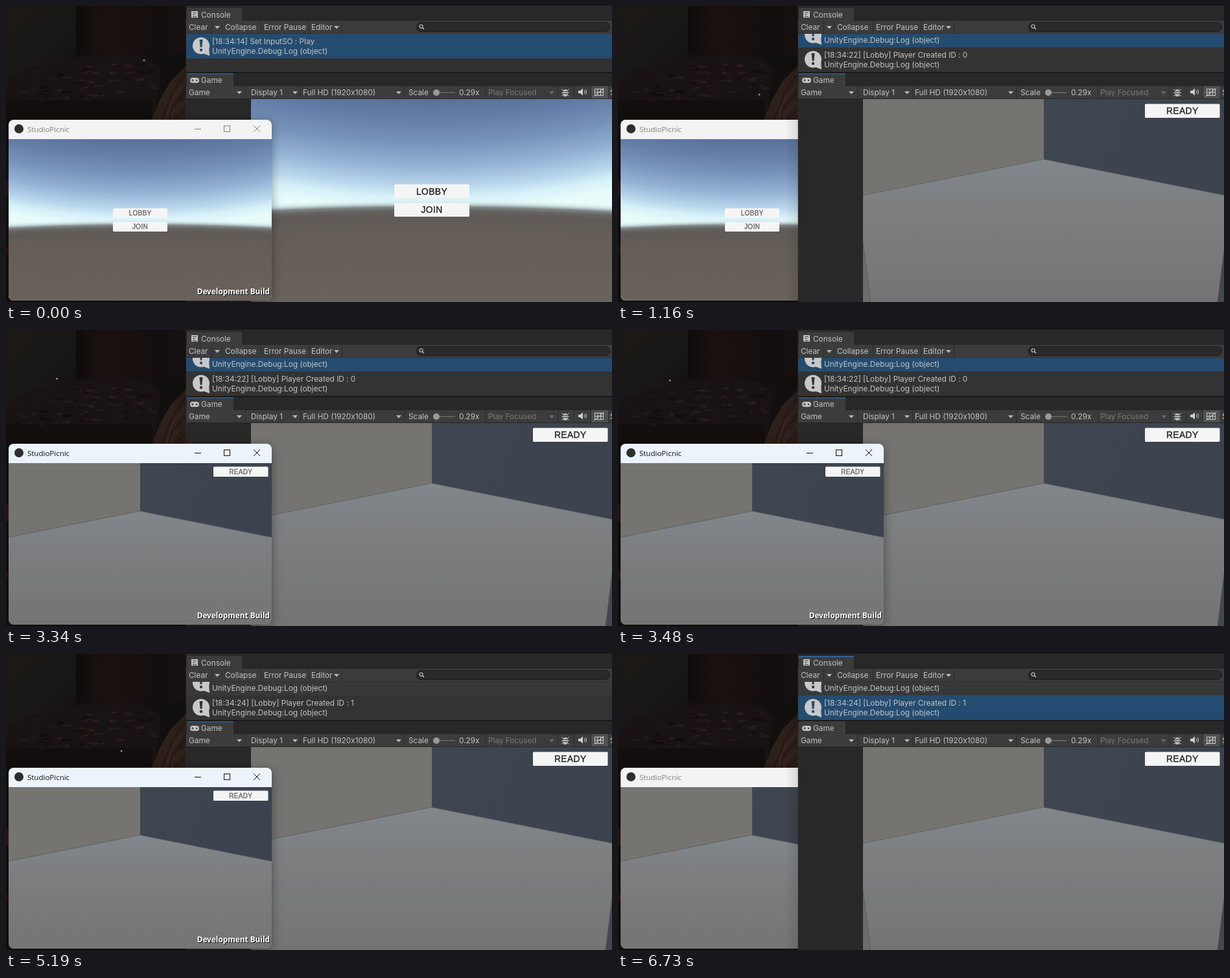
An HTML page with a canvas for the animation above (6.81 s loop, 935 px wide and 458 px high).

```html
<!DOCTYPE html>
<html lang="en">
<head>
<meta charset="utf-8">
<title>Two players joining a lobby</title>
<style>
html, body { margin: 0; width: 935px; height: 458px; overflow: hidden; background: #120f0f; }
canvas { display: block; }
</style>
</head>
<body>
<canvas id="stage" width="935" height="458"></canvas>
<script>
const c = document.getElementById('stage').getContext('2d');
const LOOP = 6810;
// Moments of the story, in ms
const HOVER_LOBBY = 520, EDITOR_FRONT = 690, HOST_LOADED = 1160, HOVER_JOIN = 2700,
  BUILD_FRONT = 2950, GUEST_LOADED = 3260, GUEST_LOGGED = 3630,
  EDITOR_AGAIN = 5790, ROW_PICKED = 5880;
const UI = '11.8px Inter, sans-serif';
const ARIAL = '"Liberation Sans", Arial, sans-serif';

function rect(x, y, w, h, fill) {
  c.fillStyle = fill;
  c.fillRect(x, y, w, h);
}
function round(x, y, w, h, r, fill) {
  c.beginPath();
  c.roundRect(x, y, w, h, r);
  c.fillStyle = fill;
  c.fill();
}
function dot(x, y, r, fill) {
  c.beginPath();
  c.arc(x, y, r, 0, 7);
  c.fillStyle = fill;
  c.fill();
}
function shape(fill, ...p) {
  c.beginPath();
  for (let i = 0; i < p.length; i += 2) c.lineTo(p[i], p[i + 1]);
  c.fillStyle = fill;
  c.fill();
}
function line(color, width, ...p) {
  c.beginPath();
  for (let i = 0; i < p.length; i += 2) c.lineTo(p[i], p[i + 1]);
  c.strokeStyle = color;
  c.lineWidth = width;
  c.stroke();
}
function text(s, x, y, fill = '#c4c4c4', font = UI, align = 'left') {
  c.font = font;
  c.textAlign = align;
  c.textBaseline = 'alphabetic';
  c.fillStyle = fill;
  c.fillText(s, x, y);
}
function stops(gradient, list) {
  list.forEach(([at, color]) => gradient.addColorStop(at, color));
  return gradient;
}
function clipped(x, y, w, h, draw) {
  c.save();
  c.beginPath();
  c.rect(x, y, w, h);
  c.clip();
  draw();
  c.restore();
}
const mix = (a, b, k) => a + (b - a) * Math.max(0, Math.min(1, k));
const gray = v => `rgb(${v},${v},${v})`;

function wallpaper(t) {
  let seed = 11;
  const rnd = () => (seed = seed * 16807 % 2147483647) / 2147483647;
  rect(0, 0, 278, 458, '#120f0f');
  rect(0, 0, 108, 125, stops(c.createLinearGradient(0, 0, 108, 110),
    [[0, '#1c1917'], [.7, '#181614'], [1, '#0f0d0d']]));
  rect(108, 0, 170, 74, stops(c.createLinearGradient(108, 0, 278, 0),
    [[0, '#0e0b0b'], [.2, '#1a100f'], [.55, '#180f0f'], [.75, '#130e0e'], [1, '#181111']]));
  // Sofa with worn patches
  c.beginPath();
  c.moveTo(0, 122);
  c.bezierCurveTo(20, 90, 70, 88, 110, 80);
  c.bezierCurveTo(170, 68, 225, 72, 240, 100);
  c.lineTo(228, 178);
  c.lineTo(0, 178);
  c.fillStyle = '#181212';
  c.fill();
  const patches = ['#231918', '#2b1c1a', '#1f1615', '#110d0d'];
  for (let i = 0; i < 110; i++) {
    const x = 12 + rnd() * 215, row = Math.floor(rnd() * 5);
    const y = 88 + row * 11 + 22 * ((x - 190) / 190) ** 2 + rnd() * 5;
    c.save();
    c.translate(x, y);
    c.rotate(-.2 + rnd() * .4);
    rect(0, 0, 3 + rnd() * 9, 1 + rnd() * 3, patches[Math.floor(rnd() * 4)]);
    c.restore();
  }
  rect(0, 146, 226, 32, 'rgba(14,11,11,.55)');
  // Armrest
  shape('#2d1f1a', 278, 92, 254, 116, 237, 146, 224, 178, 278, 178);
  for (let i = 0; i < 6; i++)
    line(i % 2 ? '#382720' : '#231712', 2, 278, 104 + i * 14, 258 - i, 132 + i * 12, 240 + i * 6, 178);
  rect(0, 270, 4, 26, '#321714');
  rect(0, 372, 4, 12, '#2a1412');
  // A small light drifting about the room
  const path = [[0, 213, 84], [1080, 214, 133], [1160, 218, 137], [2880, 74, 66],
    [3480, 80, 78], [5190, 178, 150], [LOOP, 290, 160]];
  const n = path.findIndex(p => p[0] > t), [t0, x0, y0] = path[n - 1], [t1, x1, y1] = path[n];
  const k = (t - t0) / (t1 - t0);
  dot(mix(x0, x1, k), mix(y0, y1, k), 1.5, '#8f8a86');
}

function button(label, x, y, w, h, size, ink, shade = 245) {
  round(x, y, w, h, 1.5, gray(shade));
  c.letterSpacing = size * .03 + 'px';
  text(label, x + w / 2, y + h / 2 + size * .36, ink, `${size}px ${ARIAL}`, 'center');
  c.strokeStyle = ink;
  c.lineWidth = .4;
  c.strokeText(label, x + w / 2, y + h / 2 + size * .36);
  c.letterSpacing = '0px';
}

function skyScene(x, y, w, h) {
  const cx = x + w / 2, s = h / 314, horizon = y + h * .537;
  // The sky bows downwards in the middle, the ground upwards
  const top = y - 1200 * s, R = 4865 * s;
  rect(x, y, w, h, stops(
    c.createRadialGradient(cx, top, 1200 * s, cx, top, horizon - top),
    [[0, '#5b7199'], [.2, '#667f a8'.replace(' ', '')], [.4, '#7893ba'], [.62, '#95b3d5'],
      [.8, '#b9d7ec'], [.9, '#d6f1f8'], [1, '#e6fbfa']]));
  rect(x, y, w, h, stops(
    c.createRadialGradient(cx, horizon + R, R - 150 * s, cx, horizon + R, R + 14 * s),
    [[0, '#6a625c'], [.7, '#655e58'], [.85, '#605b58'], [.89, '#656361'],
      [.925, 'rgba(120,126,127,.95)'], [.96, 'rgba(190,210,212,.6)'], [1, 'rgba(230,250,250,0)']]));
}

function lobbyScene(x, y, w, h) {
  const cx = x + w / 2, s = h / 314, cy = y + 93 * s;
  const X = d => cx + d * s, Y = d => y + d * s;
  rect(x, y, w, h, stops(c.createLinearGradient(0, cy, 0, y + h),
    [[0, '#82878c'], [.35, '#7c7e80'], [.7, '#787978'], [1, '#747474']]));
  shape('#757471', X(-290), y, cx, y, cx, cy, X(-290), Y(151));
  shape(stops(c.createLinearGradient(cx, y, X(279), cy), [[0, '#3f4650'], [1, '#3c434e']]),
    cx, y, X(290), y, X(290), Y(151), cx, cy);
  line('#5f6163', 1, X(-290), Y(151), cx, cy);
  line('#4b5056', 1, cx, cy, X(290), Y(151));
  shape('#6c6c6a', X(-280), Y(214), X(-267), Y(314), X(-280), Y(314));
  shape('#43484f', X(280), Y(218), X(268), Y(314), X(280), Y(314));
  line('#5c5d5d', 1, X(-280), Y(214), X(-267), Y(314));
  line('#55585b', 1, X(280), Y(218), X(268), Y(314));
}

function buildWindow(t, front) {
  const active = t >= BUILD_FRONT && front, ink = active ? '#111' : '#808080';
  c.save();
  c.shadowColor = 'rgba(0,0,0,.4)';
  c.shadowBlur = 16;
  c.shadowOffsetY = 3;
  round(4, 176, 406, 280, 8, '#555');
  c.restore();
  c.save();
  c.beginPath();
  c.roundRect(4, 176, 406, 280, 8);
  c.clip();
  rect(4, 176, 406, 30, active ? '#edf3fb' : '#f3f3f3');
  dot(20, 190, 7, '#2e2e2e');
  text('StudioPicnic', 33, 195, ink, '11.5px "Open Sans", sans-serif');
  line(ink, 1, 291, 190.5, 301, 190.5);
  c.strokeRect(336.5, 185.5, 9, 9);
  line(ink, 1, 382, 185, 392, 195);
  line(ink, 1, 392, 185, 382, 195);
  if (t < GUEST_LOADED) {
    skyScene(4, 206, 406, 250);
    button('LOBBY', 165, 313, 84, 15, 10, '#6a6a6a');
    button('JOIN', 165, 334, 84, 15, 10, '#6a6a6a', mix(245, 236, (t - HOVER_JOIN) / 100));
  } else {
    lobbyScene(4, 206, 406, 250);
    button('READY', 320, 211.5, 84.5, 15.5, 10, '#6a6a6a');
  }
  const bold = 'bold 11.8px "Open Sans", sans-serif';
  text('Development Build', 408, 447, '#111', bold, 'right');
  text('Development Build', 407, 446, '#fff', bold, 'right');
  c.restore();
}

const arrow = (x, y, fill = '#b8b8b8') => shape(fill, x - 4, y - 2, x + 4, y - 2, x, y + 2.5);

function logRow(y, first, selected, fill) {
  const back = selected ? '#244c70' : fill;
  rect(278, y, 657, 38, back);
  dot(301, y + 18.5, 13, '#c8c8c8');
  shape('#c8c8c8', 303, y + 30, 313, y + 20, 314, y + 34);
  shape(back, 298.5, y + 9, 303.5, y + 9, 302.3, y + 21, 299.7, y + 21);
  dot(301, y + 25, 2.2, back);
  text(first, 318, y + 15.5);
  text('UnityEngine.Debug:Log (object)', 318, y + 30.5);
}

function consolePanel(t) {
  const picked = t >= ROW_PICKED, logged = t >= GUEST_LOGGED;
  rect(278, 0, 657, 23, '#282828');
  rect(278, 0, 657, 1, '#3d302b');
  rect(279, 3, 85, 20, '#3c3c3c');
  if (picked) rect(279, 3, 85, 2, '#2f639b');
  rect(286, 8, 10, 10, '#c4c4c4');
  for (let i = 0; i < 3; i++) rect(288, 10 + i * 3, i == 1 ? 4 : 6, 1, '#3c3c3c');
  text('Console', 301, 18);
  rect(278, 23, 657, 20, '#3c3c3c');
  text('Clear', 282, 37);
  text('Collapse', 338, 37);
  text('Error Pause', 398, 37);
  text('Editor', 471, 37);
  arrow(326, 33);
  arrow(510, 33);
  for (const x of [317, 333, 393, 467, 518]) rect(x, 23, 1, 19, '#2c2c2c');
  round(633, 25, 299, 15, 7, '#1c1c1c');
  round(634, 26, 297, 13, 6, '#2a2a2a');
  c.beginPath();
  c.arc(640.5, 31.5, 2.5, 0, 7);
  c.strokeStyle = '#c4c4c4';
  c.lineWidth = 1.2;
  c.stroke();
  line('#c4c4c4', 1.4, 642.3, 33.3, 645, 36);
  rect(278, 42, 657, 61, '#313131');
  clipped(278, 43, 657, 59, () => {
    if (t < HOST_LOADED) return logRow(43, '[18:34:14] Set InputSO : Play', true);
    logRow(26, '', !logged, '#383838');
    logRow(64, logged ? '[18:34:24] [Lobby] Player Created ID : 1'
      : '[18:34:22] [Lobby] Player Created ID : 0', picked, '#333333');
  });
  rect(278, 102, 657, 2, '#1b1b1b');
}

function gamePanel(t) {
  rect(278, 104, 657, 20, '#282828');
  rect(279, 104, 72, 20, '#3c3c3c');
  if (t < ROW_PICKED) rect(279, 104, 72, 2, '#2b557f');
  round(284, 111, 14, 8, 4, '#c4c4c4');
  rect(286, 114.5, 4, 1, '#3c3c3c');
  rect(287.5, 113, 1, 4, '#3c3c3c');
  dot(294, 115, 1.3, '#3c3c3c');
  text('Game', 301, 119);
  rect(278, 124, 657, 20, '#3c3c3c');
  text('Game', 282, 138);
  text('Display 1', 378, 138);
  text('Full HD (1920x1080)', 458, 138);
  text('Scale', 621, 138);
  text('0.29x', 699, 138);
  text('Play Focused', 744, 138, '#787878');
  for (const x of [360, 446, 606]) arrow(x, 134);
  arrow(842, 134, '#6a6a6a');
  for (const x of [369, 454, 614, 740, 851, 876, 902, 929]) rect(x, 124, 1, 19, '#2c2c2c');
  rect(664, 133, 29, 2, '#5e5e5e');
  dot(664, 134, 5, '#999');
  // Bug, loudspeaker and grid buttons
  for (const d of [-4, 0, 4]) line('#bbb', 1, 857, 134 + d * 1.3, 863, 134 + d / 2, 869, 134 + d * 1.3);
  round(859.5, 129, 7, 11, 3.5, '#bbb');
  rect(860, 132, 6, 1, '#3c3c3c');
  rect(860, 135, 6, 1, '#3c3c3c');
  shape('#d0d0d0', 883, 131, 886, 131, 890, 127.5, 890, 138.5, 886, 135, 883, 135);
  for (const r of [3, 5.5]) {
    c.beginPath();
    c.arc(890, 133, r, -.8, .8);
    c.strokeStyle = '#d0d0d0';
    c.lineWidth = 1;
    c.stroke();
  }
  rect(903, 124, 26, 19, '#505050');
  c.strokeStyle = '#c8c8c8';
  c.strokeRect(908.5, 128.5, 13, 10);
  line('#c8c8c8', 1, 909, 133.5, 921, 133.5);
  line('#c8c8c8', 1, 913, 129, 913, 138);
  line('#c8c8c8', 1, 917.5, 129, 917.5, 138);
  line('#c8c8c8', 1, 907, 140, 923, 127);
  text('S', 932, 138);
  rect(278, 143, 657, 315, '#282828');
  clipped(378, 144, 557, 314, () => {
    if (t < HOST_LOADED) {
      skyScene(378, 144, 558, 314);
      button('LOBBY', 599, 276, 116, 21.5, 13.8, '#262626', mix(245, 236, (t - HOVER_LOBBY) / 100));
      button('JOIN', 599, 304.5, 116, 21.5, 13.8, '#262626');
    } else {
      lobbyScene(378, 144, 558, 314);
      button('READY', 813, 151.5, 115.5, 21.5, 13.8, '#262626');
    }
  });
}

function editor(t) {
  rect(258, 0, 20, 458, stops(c.createLinearGradient(258, 0, 278, 0),
    [[0, 'rgba(0,0,0,0)'], [1, 'rgba(0,0,0,.11)']]));
  rect(277, 0, 1, 458, 'rgba(70,50,42,.35)');
  consolePanel(t);
  gamePanel(t);
}

function frame(now) {
  const t = now % LOOP;
  const front = t < EDITOR_FRONT || (t >= BUILD_FRONT && t < EDITOR_AGAIN);
  wallpaper(t);
  if (front) editor(t);
  buildWindow(t, front);
  if (!front) editor(t);
  requestAnimationFrame(frame);
}
requestAnimationFrame(frame);
</script>
</body>
</html>
```
